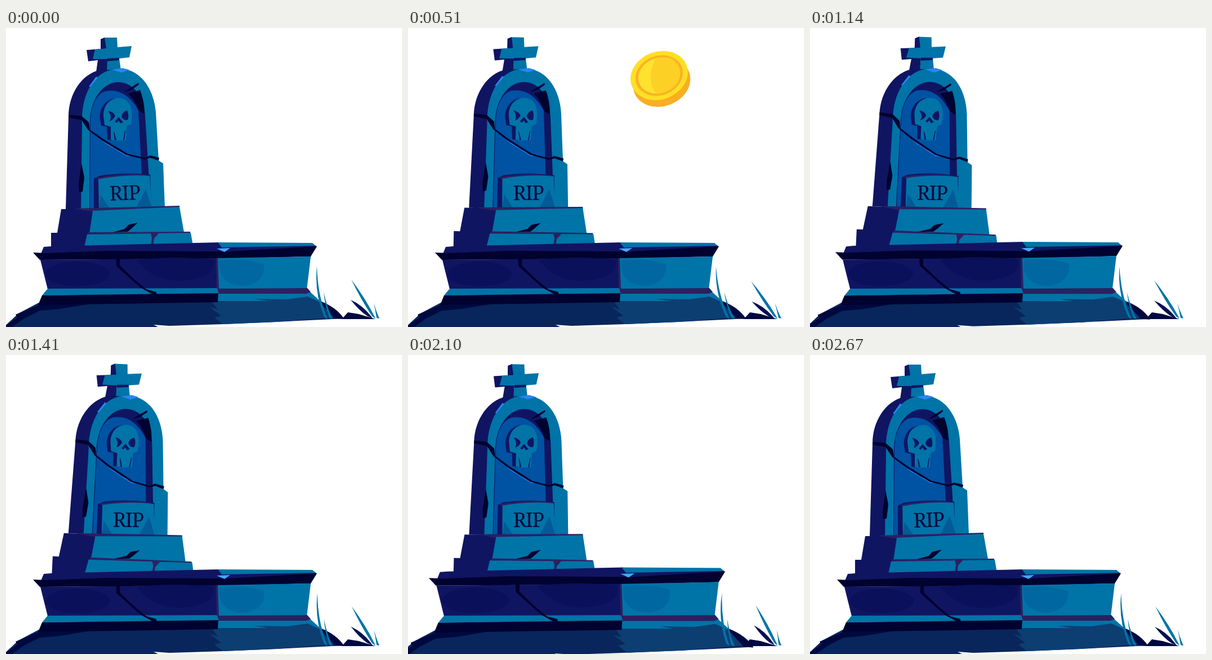
An HTML page that plays this animation: 703x530 px, repeating every 2.7 s.

```html
<!DOCTYPE html>
<html lang="en">
<head>
<meta charset="utf-8">
<title>Tombstone and coins</title>
<style>
html, body { margin: 0; width: 100%; height: 100%; overflow: hidden; background: #fff; }
svg { display: block; }
.navy { fill: #101562; }
.teal { fill: #0073a7; }
.blue { fill: #0052a2; }
.ink { fill: #00022f; }
.plum { fill: #2c2060; }
.glow { fill: #2a86ee; }
.stain { fill: #0a1059; }
text { font: 36px "Noto Serif", serif; letter-spacing: -1.5px; fill: #020b3c; }
</style>
</head>
<body>
<svg width="703" height="530" viewBox="0 0 703 530">
  <g id="tomb">
    <!-- cross -->
    <path class="navy" d="M168 20 175 17 180 36 180 78 160 78 163 57 146 59 143 39 168 37Z"/>
    <path class="teal" d="M174 17H197L198 34 223 32 219 52 201 54 204 75 179 77 180 55 154 55 158 38 176 36Z"/>
    <path class="navy" d="M168 20 175 17 178 36 168 37ZM180 54 201 53 201 57 180 59Z"/>
    <!-- headstone -->
    <path class="navy" d="M165 75C135 82 111 116 111 157L106 321H152L150 160 200 73Z"/>
    <path class="teal" d="M133 322 135 170C133 112 160 73 200 72C242 72 263 112 266 150L271 235 279 240 282 320Z"/>
    <path class="glow" d="M188 74 207 71 219 74 205 79ZM160 86 163 88 150 104 147 104Z"/>
    <path class="ink" d="M134 240 139 265 136 290 130 291 129 276Z"/>
    <path class="navy" d="M148 322 149 165C150 126 172 96 200 96C229 97 244 125 247 155L256 300Z"/>
    <path class="blue" d="M149 322 150 165C151 137 160 118 176 112Q212 105 235 146L243 300Z"/>
    <path class="ink" d="M217 116 238 110Q246 130 246 152L236 147Q230 129 217 116Z"/>
    <path class="ink" d="M210 114 221 106 235 97 236 100 224 109Z"/>
    <!-- skull -->
    <path class="navy" d="M193 125C175 127 165 145 167 161L169 173 179 175 180 198 190 199 205 180Z"/>
    <path class="teal" d="M200 124C181 125 173 140 173 155L175 172 186 175 186 198 194 200 213 199 214 174 222 170C226 150 223 124 200 124Z"/>
    <path class="navy" d="M181 147Q191 148 194 156Q190 163 184 165Q189 156 181 147ZM215 146Q206 149 205 157Q209 165 216 163Q219 154 215 146ZM200 158 193 166 197 168 200 164 203 169 208 167Z"/>
    <path class="navy" d="M191 184 192 184 196 199 193 199ZM211 182 212 182 210 199 208 199Z"/>
    <!-- split -->
    <path class="glow" d="M165 196 195 215 222 227 214 227 180 207Z"/>
    <path class="ink" d="M111 154 124 155 134 156 147 167 149 180 173 197 216 223 246 230 256 226 272 230 271 235 256 230 246 233 213 225 170 199 146 181 134 163 111 159Z"/>
    <!-- plaque -->
    <path class="navy" d="M156 267 166 262Q210 255 256 260L258 319 156 322Z"/>
    <path class="plum" d="M158 266Q210 255 255 261V265L166 270Z"/>
    <path class="teal" d="M164 268Q210 259 255 262L259 318 165 322Z"/>
    <path fill="#005a96" d="M165 322 168 296 185 321ZM231 319 248 285 259 318Z"/>
    <text x="184" y="306" transform="rotate(-2 184 306)">RIP</text>
    <!-- steps -->
    <path class="navy" d="M98 321 155 321 149 364 145 397H80V363H91Z"/>
    <path class="plum" d="M120 320 308 315V320L150 325Z"/>
    <path class="teal" d="M154 324 308 317 316 362 148 364Z"/>
    <path class="plum" d="M147 362 327 361V366L142 369Z"/>
    <path class="teal" d="M144 366 328 363 333 392H138Z"/>
    <path class="plum" d="M257 364H271L263 373 261 388H257L259 372Z"/>
    <path class="ink" d="M190 362 211 356 217 349 234 345 222 356 216 361Z"/>
  </g>
  <g id="coin">
    <ellipse id="rim" rx="52" fill="#f9ae23"/>
    <ellipse class="face" rx="52" fill="#ffdf25"/>
    <ellipse class="face" rx="43" fill="#f9b324"/>
    <ellipse class="face" rx="38" fill="#ffe22e"/>
    <path class="shine" d="M-16 34Q-26 0 4 -37Q38 -34 38 0Q35 36 0 38Z" fill="#fdd026"/>
  </g>
  <g id="slab">
    <!-- soil -->
    <path fill="#08265b" d="M-6 532 22 506 58 487 380 480 555 483Q585 494 600 515L480 521 385 525 290 528 262 526 274 532Z"/>
    <path fill="#0c3e72" d="M365 484 555 483Q572 490 590 512L480 521 385 525 370 513 382 510 361 494 376 499Z"/>
    <path fill="#00093f" d="M-6 532 20 513 17 508 58 491 150 489 95 498 60 501 32 515 8 532ZM553 482Q588 495 600 516L584 515Z"/>
    <!-- top -->
    <path class="navy" d="M67 388 80 387 333 381 378 380 390 392 380 399 62 400Z"/>
    <path class="teal" d="M376 380 544 381 551 387 384 390Z"/>
    <path class="navy" d="M384 389 551 386 549 392 390 397Z"/>
    <path class="ink" d="M48 398 70 399 180 395 375 396 395 396 552 387 541 405 375 409 60 411Z"/>
    <path fill="#4aa6ff" d="M374 391 398 390 388 397Z"/>
    <!-- front -->
    <path class="navy" d="M61 411 375 408 377 463 74 463Z"/>
    <ellipse class="stain" cx="127" cy="436" rx="57" ry="22"/>
    <path class="stain" d="M232 411Q300 403 368 411Q374 435 340 444Q270 460 232 411Z"/>
    <path class="teal" d="M375 408 541 405 534 463H376Z"/>
    <path fill="#0067a0" d="M379 412Q420 407 458 418Q461 450 425 457Q375 457 379 412Z"/>
    <path class="teal" d="M74 462 377 461 380 471 64 474Z"/>
    <path class="ink" d="M64 474 380 470 376 486 57 491Z"/>
    <path class="teal" d="M377 470 540 468 560 486 376 484Z"/>
    <path class="plum" d="M375 462 535 461 541 468 533 471 378 471ZM373 409H376L378 463 374 462Z"/>
    <path fill="#0c3e72" d="M376 484 465 484 440 480 500 481 535 476 560 487 376 491Z"/>
    <path class="ink" d="M195 397 203 396 202 421 228 446 249 463 267 468 268 487 260 487 260 472 240 461 225 448 196 422Z"/>
  </g>
  <path fill="#00093f" d="M596 516 607 504 626 507 656 516Z"/>
  <g id="grassLeft" class="teal">
    <path d="M552 422Q553 475 571 516L565 512Q547 470 552 422Z"/>
    <path d="M564 468Q570 496 580 516L574 514Q566 492 564 468Z"/>
  </g>
  <g id="grassRight">
    <path fill="#001152" d="M612 482Q635 492 651 515L642 511Q628 502 612 482Z"/>
    <path class="teal" d="M613 446Q640 482 656 515L650 511Q631 483 613 446ZM653 487Q657 503 663 515L658 514Z"/>
  </g>
</svg>
<script>
const LOOP = 2700, DROP_GAP = 1250;
const $ = id => document.getElementById(id);
const place = (id, transform) => $(id).setAttribute('transform', transform);
const clamp = v => Math.max(0, Math.min(1, v));

// Sideways travel of the cross, as [time, pixels]
const sway = [[0, 0], [510, 8.3], [750, 12], [1140, 17.6], [1320, 18], [1650, 15.7], [2100, 9], [LOOP, 0]];

function slope(i) {
  if (!i || i === sway.length - 1) return 0;
  const [a, , b] = sway.slice(i - 1, i + 2);
  return (b[1] - a[1]) / (b[0] - a[0]);
}

function swayAt(t) {
  const i = sway.findIndex(key => key[0] > t) - 1;
  const [t0, a] = sway[i], [t1, b] = sway[i + 1];
  const d = t1 - t0, u = (t - t0) / d, v = 1 - u;
  return v * v * (1 + 2 * u) * a + u * u * (1 + 2 * v) * b
    + u * v * d * (v * slope(i) - u * slope(i + 1));
}

// Swelling of the slab as it swallows a coin
function bump(p) {
  return 0.044 * (p < 850 ? clamp((p - 725) / 125) : clamp((1250 - p) / 400));
}

function drawCoin(p) {
  const size = clamp((p - 260) / 230);
  const y = 48 + 0.00268 * Math.max(0, p - 390) ** 2;
  const visible = size > 0 && y < 445;
  $('coin').style.display = visible ? '' : 'none';
  if (!visible) return;
  const squash = Math.min(1, 0.72 + 0.00085 * (p - 400));
  const depth = 22 * Math.sqrt(1 - squash * squash);
  place('coin', `translate(447 ${y}) scale(${size}) rotate(${48 - 0.618 * (p - 400)}) translate(0 ${-depth / 4})`);
  $('rim').setAttribute('ry', 52 * squash);
  $('rim').setAttribute('cy', depth);
  for (const face of document.querySelectorAll('.face'))
    face.setAttribute('ry', face.getAttribute('rx') * squash);
  document.querySelector('.shine').setAttribute('transform', `scale(1 ${squash})`);
}

function draw(now) {
  const t = now % LOOP;
  const wind = Math.sin(t / LOOP * 2 * Math.PI);
  const scale = 1 + Math.max(bump(t < DROP_GAP ? t : 0), bump(t - DROP_GAP));
  place('tomb', `rotate(${swayAt(t) / 382 * 180 / Math.PI} 215 422)`);
  place('slab', `translate(300 460) scale(${scale}) translate(-300 -460)`);
  place('grassLeft', `rotate(${-3.5 * wind} 570 514)`);
  place('grassRight', `rotate(${-3.5 * wind} 658 515)`);
  drawCoin(t < DROP_GAP ? t : t - DROP_GAP);
}

const start = performance.now();
(function tick() {
  draw(performance.now() - start);
  requestAnimationFrame(tick);
})();
</script>
</body>
</html>
```
